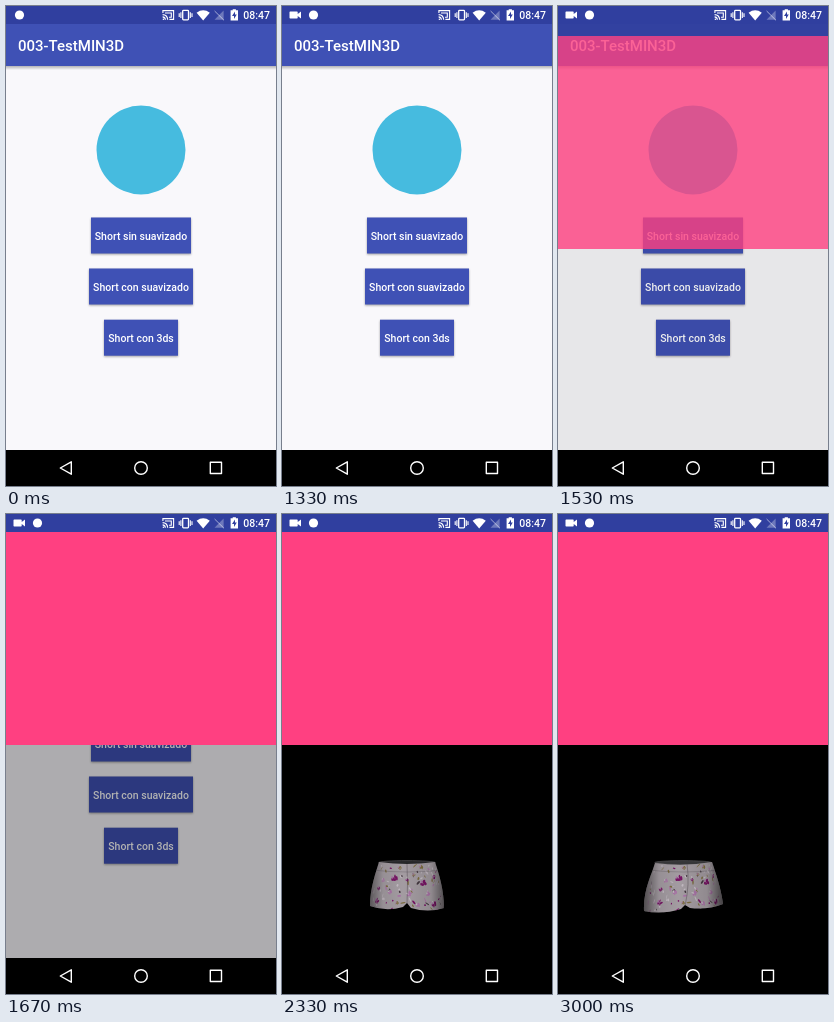
An HTML page that plays this animation: 270x480 px, repeating every 3070 ms.

```html
<!DOCTYPE html>
<html lang="es">
<head>
<meta charset="utf-8">
<title>003-TestMIN3D</title>
<style>
  html, body { margin: 0; width: 100%; height: 100%; overflow: hidden; background: #000; }
  svg { display: block; width: 100vw; height: 100vh; }
  text { font-family: Roboto, "Noto Sans", sans-serif; font-weight: 500; fill: #fff; }
  .button text { font-size: 10.5px; text-anchor: middle; }
  .line { fill: none; stroke: #fff; }
</style>
</head>
<body>
<svg viewBox="0 0 270 480">
  <defs>
    <linearGradient id="barShade" x2="0" y2="1">
      <stop stop-color="#000" stop-opacity=".28"/>
      <stop offset="1" stop-color="#000" stop-opacity="0"/>
    </linearGradient>
    <radialGradient id="dot">
      <stop stop-color="#fff" stop-opacity=".95"/>
      <stop offset=".38" stop-color="#fff" stop-opacity=".88"/>
      <stop offset=".52" stop-color="#fff" stop-opacity=".5"/>
      <stop offset=".88" stop-color="#fff" stop-opacity=".42"/>
      <stop offset="1" stop-color="#fff" stop-opacity="0"/>
    </radialGradient>
    <linearGradient id="bodyShade">
      <stop stop-color="#000" stop-opacity=".55"/>
      <stop offset=".2" stop-color="#000" stop-opacity=".12"/>
      <stop offset=".45" stop-color="#000" stop-opacity=".04"/>
      <stop offset=".8" stop-color="#000" stop-opacity=".15"/>
      <stop offset="1" stop-color="#000" stop-opacity=".6"/>
    </linearGradient>
    <filter id="soft" x="-10%" y="-20%" width="120%" height="150%">
      <feGaussianBlur stdDeviation="1"/>
    </filter>
    <clipPath id="cut"><path id="cutPath"/></clipPath>
  </defs>

  <rect width="270" height="444" fill="#f9f8fb"/>
  <rect y="60" width="270" height="4" fill="url(#barShade)"/>
  <rect y="18" width="270" height="42" fill="#3f51b5"/>
  <text x="12" y="45" font-size="15">003-TestMIN3D</text>
  <circle cx="135" cy="144" r="44.5" fill="#46bbdf"/>
  <g id="buttons"></g>
  <rect id="dim" y="18" width="270" height="426" opacity="0"/>

  <rect width="270" height="18" fill="#303f9f"/>
  <g id="screen" opacity="0">
    <rect width="270" height="18" fill="#303f9f"/>
    <rect y="18" width="270" height="213" fill="#ff4081"/>
  </g>

  <g id="shorts" visibility="hidden">
    <ellipse id="waist" cx="125" cy="348.6" rx="28.3" ry="2" fill="#29292b" stroke="#58565a" stroke-width=".6"/>
    <g clip-path="url(#cut)">
      <rect x="80" y="340" width="90" height="64" fill="#aaa2a8"/>
      <g id="print"></g>
      <path id="seam" fill="none" stroke="#3a3038" stroke-width=".7" opacity=".5"/>
      <path d="M90 356Q125 360 161 356" fill="none" stroke="#4a4048" stroke-width=".5" opacity=".5"/>
      <rect x="85" y="340" width="80" height="64" fill="url(#bodyShade)"/>
    </g>
  </g>

  <g id="status" fill="#fff">
    <path id="camera" d="M7.5 6.2Q7.5 5.5 8.2 5.5H15Q15.7 5.5 15.7 6.2V8L19 5.4V12.6L15.7 10V11.8Q15.7 12.5 15 12.5H8.2Q7.5 12.5 7.5 11.8Z"/>
    <circle id="badge" cy="9" r="4.6"/>
    <g class="line" stroke-width="1.1">
      <path d="M156.9 7V4.6H167.6V13.4H163.4M156.6 8.6Q161.4 8.8 161.7 13.8M156.6 10.9Q159.2 11.1 159.4 13.8"/>
      <path d="M159 7H165.3V11.2H163"/>
      <rect x="176.7" y="4.3" width="5.8" height="9.6" rx=".8" stroke-width="1.3"/>
      <path d="M174.9 6.2V12M173.2 7.3V10.9M184.3 6.2V12M186 7.3V10.9"/>
    </g>
    <circle cx="157.4" cy="13.2" r=".8"/>
    <path d="M190.6 6.7Q197.2 1.9 203.8 6.7L197.2 14.4Z"/>
    <path d="M208.5 13.8L217.6 4.6V13.8Z" opacity=".3"/>
    <path d="M208.6 5L218 14.3" class="line" stroke-width="1" opacity=".55"/>
    <path d="M226.7 3.2H229.9V4.3H232V14.4H224.6V4.3H226.7Z"/>
    <path d="M229 5.5L226 10H228V13L230.8 8.5H229Z" fill="#303f9f"/>
    <text x="264" y="12.9" font-size="10.5" text-anchor="end">08:47</text>
  </g>

  <rect y="444" width="270" height="36"/>
  <g class="line" stroke-width="1.4" stroke-linejoin="round">
    <path d="M54.3 462L65.3 455.8V468.2Z"/>
    <circle cx="135" cy="462" r="6.3"/>
    <rect x="204.3" y="456.3" width="11.2" height="11.2"/>
  </g>
  <circle id="touch" cx="134" cy="330" r="9" fill="url(#dot)" opacity="0"/>
</svg>
<script>
const LOOP = 3070;
const TICKS = [0, 70, 730, 800, 870, 930, 1000, 1070, 1130, 1200, 1270, 1330, 1470, 1530,
  1670, 1730, 1800, 2330, 2400, 2470, 2530, 2600, 2670, 2730, 2800, 2870, 2930, 3000];

const $ = id => document.getElementById(id);
const set = (el, attrs) => {
  for (const key in attrs) el.setAttribute(key, attrs[key]);
  return el;
};
const add = (parent, tag, attrs) =>
  parent.appendChild(set(document.createElementNS("http://www.w3.org/2000/svg", tag), attrs));
const mix = (a, b, k) => a + (b - a) * k;

// Linear lookup in rows of [time, value].
function track(rows, t) {
  if (t <= rows[0][0]) return rows[0][1];
  for (let i = 1; i < rows.length; i++) {
    const [t0, a] = rows[i - 1], [t1, b] = rows[i];
    if (t <= t1) return mix(a, b, (t - t0) / (t1 - t0));
  }
  return rows[rows.length - 1][1];
}

// Blends two path strings number by number.
function blend(a, b, k) {
  const ends = b.match(/[\d.]+/g);
  let i = 0;
  return a.replace(/[\d.]+/g, n => mix(+n, +ends[i++], k).toFixed(2));
}

let seed = 11;
const rand = () => (seed = seed * 16807 % 2147483647) / 2147483647;
const span = (a, b) => mix(a, b, rand());

for (const [label, x, y, w] of [
  ["Short sin suavizado", 85, 211.5, 100],
  ["Short con suavizado", 83, 262.5, 104],
  ["Short con 3ds", 98, 313.7, 74]
]) {
  const g = add($("buttons"), "g", { class: "button" });
  add(g, "rect", { x, y: y + 1, width: w, height: 36, opacity: .35, filter: "url(#soft)" });
  add(g, "rect", { x, y, width: w, height: 36, fill: "#3f51b5" });
  add(g, "text", { x: 135, y: y + 22 }).textContent = label;
}

const OUTLINE = [
  "M97 348C94 358 88 374 88 392Q104 398 121 393L125 389L129 394Q146 399 162 394C162 376 157 360 153 348Q125 352 97 348Z",
  "M97 349C94 360 85 376 86 397Q104 401 123 395L127 391L132 394Q150 396 165 390C163 374 158 360 154 348Q125 353 97 349Z"
];
const SEAM = ["M125 350Q126 370 125 390", "M129 350Q132 370 127 392"];
const INK = ["#7c1568", "#b077ad", "#80703f", "#463a42", "#cbc2ca"];
const BLOOMS = [
  [112, 364, 4, 0], [141, 369, 4.4, 0], [152, 363, 3.4, 0], [95, 387, 4, 0],
  [152, 390, 4, 0], [127, 380, 3.4, 1], [118, 354, 2.4, 2], [139, 353, 2.8, 2],
  [101, 366, 3, 1], [108, 378, 3, 1], [136, 391, 3, 1], [97, 374, 2.2, 0],
  [146, 380, 3, 1], [132, 361, 2, 2], [115, 389, 2.2, 2], [125, 366, 2, 0]
];
const radius = y => 28 + (y - 348) * .21;
const marks = [];

function mark(angle, y) {
  const el = add($("print"), "g", {});
  marks.push({ el, angle, y });
  return el;
}
function petal(g, x, y, rx, ry, fill) {
  add(g, "ellipse", { rx, ry, fill, transform: `translate(${x} ${y}) rotate(${span(0, 180)})` });
}

for (let i = 0; i < 110; i++) {
  const g = mark(span(-2, 1.6), span(351, 399));
  petal(g, 0, 0, span(.8, 2.8), span(.3, 1), INK[[4, 3, 1, 4, 2, 4, 0][i % 7]]);
}
for (const [x, y, size, ink] of BLOOMS) {
  const g = mark(Math.asin((x - 125) / radius(y)), y);
  for (let i = 0; i < 5; i++) {
    const a = i * 1.257 + span(-.4, .4), d = size * .5;
    petal(g, Math.cos(a) * d, Math.sin(a) * d * .8, size * span(.3, .6), size * span(.15, .35),
      i === 3 ? INK[ink === 1 ? 4 : 1] : INK[ink]);
  }
}

function drawShorts(k) {
  const outline = blend(...OUTLINE, k);
  set($("cutPath"), { d: outline });
  set($("seam"), { d: blend(...SEAM, k) });
  set($("waist"), { fill: `rgb(${[38, 38, 40].map(c => c + 16 * k)})` });
  const turn = .28 * k;
  for (const { el, angle, y } of marks) {
    const a = angle + turn, depth = Math.cos(a);
    const x = 125 + radius(y) * Math.sin(a);
    const drop = -Math.sin(a) * 3 * k * (y - 348) / 45;
    set(el, {
      transform: `translate(${x} ${y + drop}) scale(${Math.max(depth, .05)} 1)`,
      visibility: depth > 0 ? "inherit" : "hidden"
    });
  }
}

function draw(t) {
  const recording = t >= 70;
  set($("camera"), { visibility: recording ? "visible" : "hidden" });
  set($("badge"), { cx: recording ? 31.5 : 13.5 });

  set($("touch"), {
    opacity: t < 730 ? 0 : track([[1200, 1], [1270, .5], [1330, 0]], t),
    r: track([[730, 9], [930, 9.8], [1200, 9]], t)
  });

  set($("screen"), {
    opacity: t < 1470 ? 0 : track([[1470, .3], [1530, .8], [1670, 1]], t),
    transform: `translate(0 ${track([[1470, 29], [1530, 12], [1670, 0]], t)})`
  });
  set($("dim"), {
    opacity: t < 1470 ? 0 : track([[1470, .02], [1530, .07], [1670, .305], [1730, .72], [1800, 1]], t)
  });

  const shown = t >= 2330;
  set($("shorts"), { visibility: shown ? "visible" : "hidden" });
  if (shown) drawShorts((t - 2330) / 670);
}

const start = performance.now();
let last = -1;
function frame() {
  const now = (performance.now() - start) % LOOP;
  const tick = TICKS.filter(t => t <= now).pop() || 0;
  if (tick !== last) draw(last = tick);
  requestAnimationFrame(frame);
}
frame();
</script>
</body>
</html>
```
